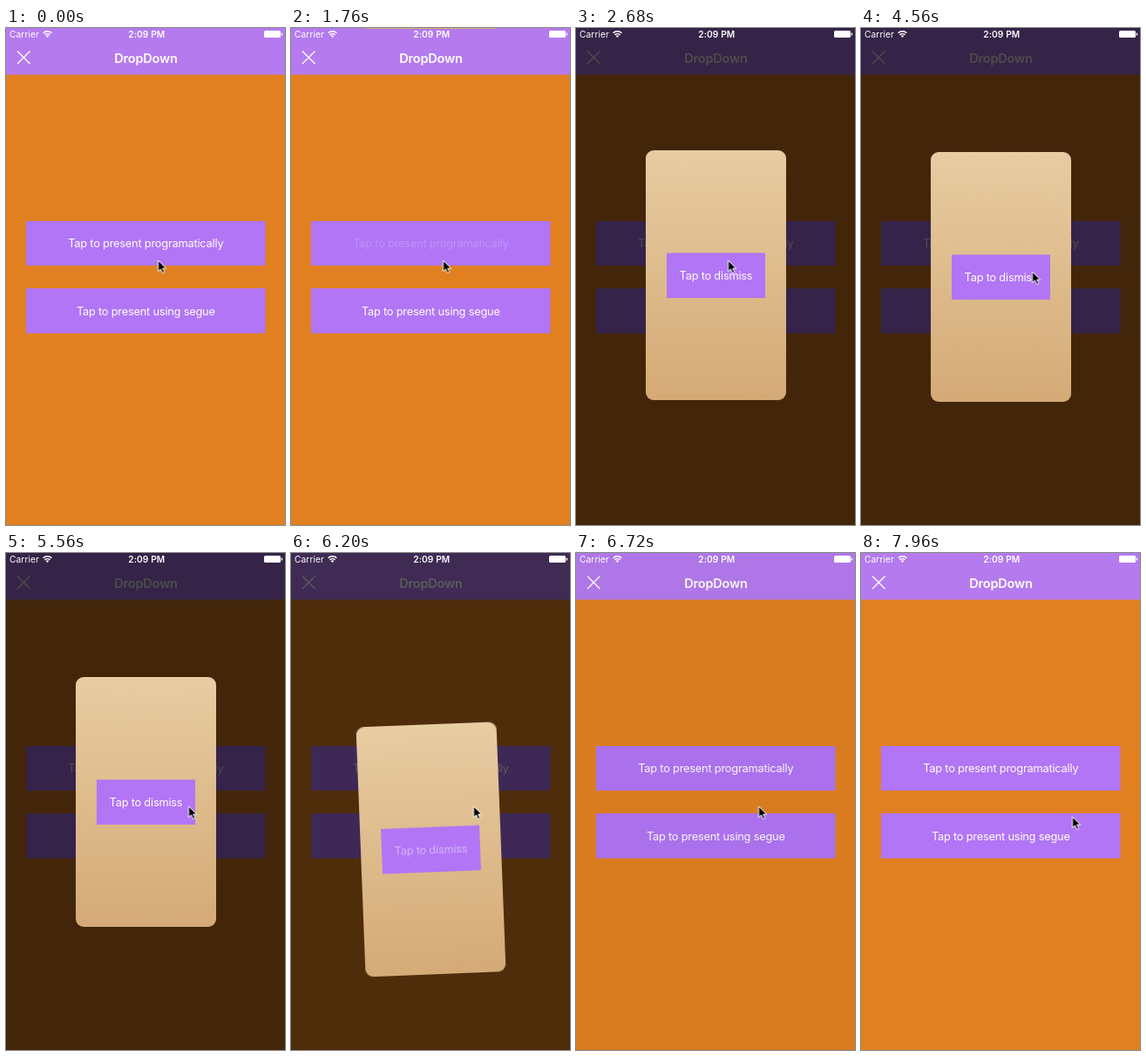
Write an HTML page that moves like this. It is 320x569 px and loops after 8 s.

```html
<!DOCTYPE html>
<html lang="en">
<head>
<meta charset="utf-8">
<title>DropDown</title>
<style>
  html, body { margin: 0; width: 100%; height: 100%; overflow: hidden; background: #e08020; }
  svg { display: block; width: 100vw; height: 100vh; }
  text { font-family: Inter, Roboto, sans-serif; fill: #fff; }
  .label { font-size: 12.8px; letter-spacing: -.21px; text-anchor: middle; }
  .title { font-size: 14.5px; font-weight: 600; letter-spacing: -.2px; text-anchor: middle; }
  .status { font-size: 10.2px; letter-spacing: .1px; }
  .button { fill: #b175f5; }
  #card { transform-box: fill-box; transform-origin: center; }
</style>
</head>
<body>
<svg viewBox="0 0 320 569">
  <defs>
    <linearGradient id="sand" x1="0" y1="0" x2="0" y2="1">
      <stop offset="0" stop-color="#e8cca2"/>
      <stop offset="1" stop-color="#d4aa76"/>
    </linearGradient>
  </defs>

  <rect width="320" height="569" fill="#e08020"/>
  <rect width="320" height="53.5" fill="#b47aee"/>
  <path d="M13 26.5l14.5 14.5M27.5 26.5L13 41" stroke="#fff" stroke-width="1.4"/>
  <text class="title" x="160.5" y="39.5">DropDown</text>

  <rect class="button" x="23" y="221" width="274.5" height="51"/>
  <text class="label" id="present" x="160.3" y="251">Tap to present programatically</text>
  <rect class="button" x="23" y="298" width="274.5" height="51.5"/>
  <text class="label" x="160.3" y="328.5">Tap to present using segue</text>

  <rect id="dim" width="320" height="569" opacity="0"/>

  <g id="card">
    <rect x="80" y="142" width="161" height="286" rx="9" fill="url(#sand)"/>
    <rect class="button" x="104" y="259.5" width="113" height="51.5"/>
    <text class="label" id="dismiss" x="160.5" y="290">Tap to dismiss</text>
  </g>

  <g>
    <text class="status" x="4" y="10.8">Carrier</text>
    <text class="status" x="161.3" y="10.8" font-weight="600" text-anchor="middle">2:09 PM</text>
    <g fill="none" stroke="#fff" stroke-width="1.5">
      <path d="M42.6 5.8a7 7 0 0 1 9.8 0M44.5 7.9a4.3 4.3 0 0 1 6 0"/>
    </g>
    <path d="M47.5 11l-1.7-1.8a2.4 2.4 0 0 1 3.4 0z" fill="#fff"/>
    <rect x="296" y="3" width="19" height="8" rx="1.5" fill="#fff"/>
    <rect x="315.7" y="5.4" width="1.4" height="3.2" rx=".6" fill="#fff"/>
  </g>

  <path id="cursor" d="M0 0V12.6L2.9 9.9L5.1 14.6L7.3 13.6L5.2 9.1H9.2Z"
        fill="#000" stroke="#fff" stroke-width="1" stroke-linejoin="round"/>
</svg>

<script>
const LOOP = 8000;
const IN = 1758, OUT = 6048, OUT_TIME = 800;

// Each step is [time in ms, styles, easing towards the next step].
function play(id, steps) {
  const frames = steps.map(([time, style, easing = 'linear']) =>
    ({ ...style, offset: time / LOOP, easing }));
  document.getElementById(id).animate(frames, { duration: LOOP, iterations: Infinity });
}

const fade = opacity => ({ opacity });
const pose = (y, angle = 0) => ({ transform: `translate(0px, ${y}px) rotate(${angle}deg)` });
const at = (x, y) => ({ transform: `translate(${x}px, ${y}px)` });

// Critically damped drop from just above the stage.
const drop = [];
for (let t = 0; t <= 1240; t += 40) {
  const k = 8.15 * t / 1000;
  drop.push([IN + t, pose(-428 * (1 + k) * Math.exp(-k))]);
}

play('card', [
  [0, pose(-428)],
  ...drop,
  [3040, pose(0)],
  [OUT, pose(0), 'ease-in-out'],
  [OUT + OUT_TIME, pose(730, -30)],
  [LOOP, pose(730, -30)]
]);

play('dim', [
  [0, fade(0)],
  [IN, fade(0), 'ease-in-out'],
  [IN + 400, fade(.7)],
  [OUT, fade(.7), 'ease-in-out'],
  [OUT + OUT_TIME, fade(0)],
  [LOOP, fade(0)]
]);

function press(id, down, up) {
  play(id, [
    [0, fade(1)], [down, fade(1)], [down, fade(.2)],
    [up, fade(.2)], [up + 470, fade(1)], [LOOP, fade(1)]
  ]);
}
press('present', 1640, IN);
press('dismiss', 5880, OUT);

play('cursor', [
  [0, at(174.5, 266)],
  [3600, at(174.5, 266), 'ease-in-out'],
  [4400, at(196.5, 279)],
  [4800, at(196.5, 279), 'ease-in-out'],
  [5600, at(209.5, 290)],
  [7300, at(209.5, 290), 'ease-in-out'],
  [7900, at(242.5, 302)],
  [LOOP, at(242.5, 302)]
]);
</script>
</body>
</html>
```
